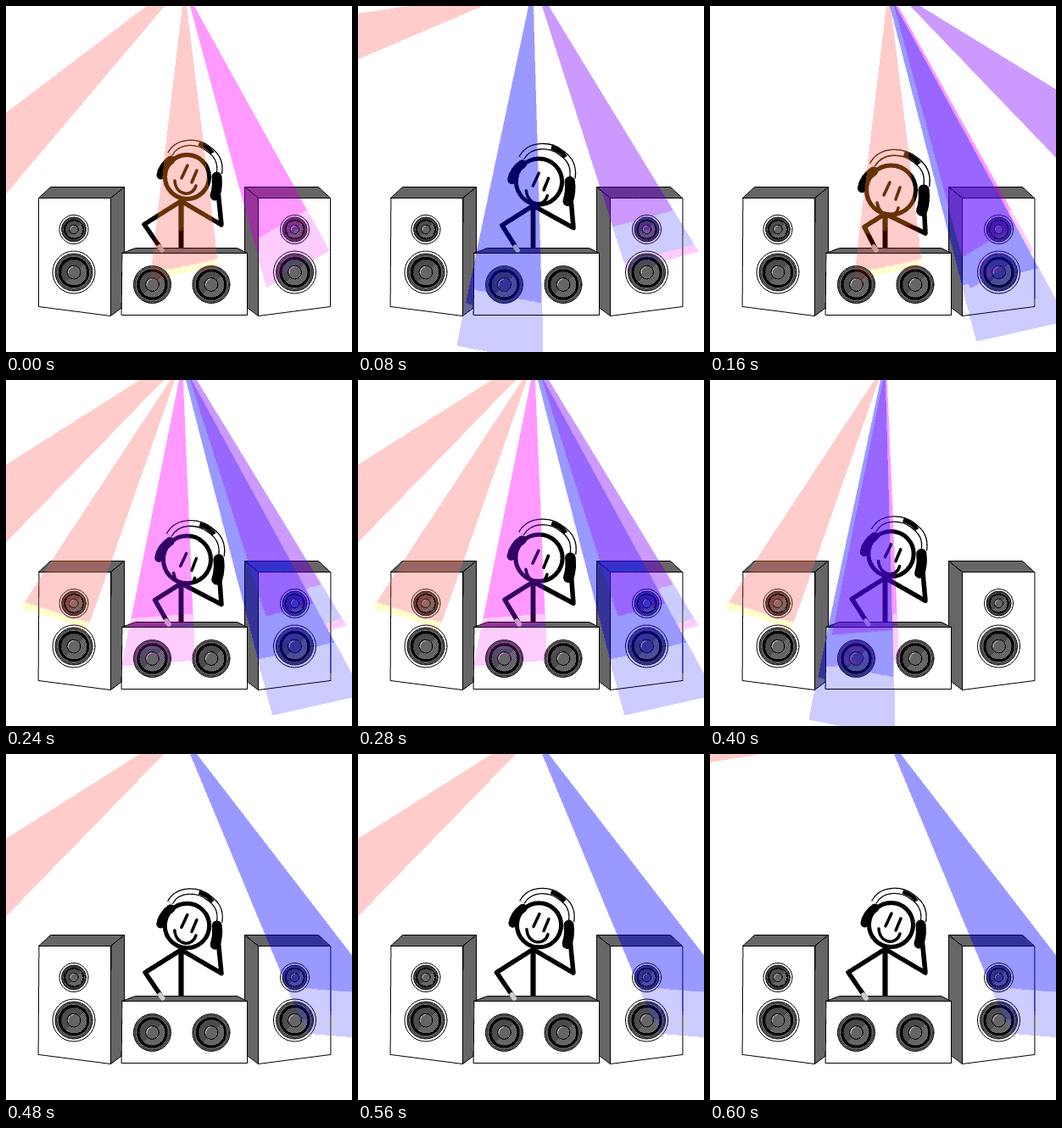
Animation of 408 by 408 pixels, one loop 0.64 s. Source, as an HTML page with a canvas:

```html
<!DOCTYPE html>
<html lang="en">
<head>
<meta charset="utf-8">
<title>Stick figure DJ</title>
<style>
  html, body { margin: 0; width: 100%; height: 100%; overflow: hidden; background: #fff; }
  canvas { display: block; width: 408px; height: 408px; filter: url(#palette); }
  svg { position: absolute; width: 0; height: 0; }
</style>
</head>
<body>
<canvas id="stage" width="408" height="408"></canvas>
<svg aria-hidden="true">
  <!-- rounds every channel to six levels, which bands the fading beams -->
  <filter id="palette" x="0" y="0" width="100%" height="100%" color-interpolation-filters="sRGB">
    <feComponentTransfer>
      <feFuncR type="discrete" tableValues="0 .2 .2 .4 .4 .6 .6 .8 .8 1"/>
      <feFuncG type="discrete" tableValues="0 .2 .2 .4 .4 .6 .6 .8 .8 1"/>
      <feFuncB type="discrete" tableValues="0 .2 .2 .4 .4 .6 .6 .8 .8 1"/>
    </feComponentTransfer>
  </filter>
</svg>
<script>
const ctx = document.getElementById('stage').getContext('2d');
const STEP = 40, STEPS = 16;

const RED = '255,83,40', PINK = '200,0,255', BLUE = '0,0,255', PURPLE = '74,0,255';

// Each lamp: colour, x1 and x2 on the top edge, then the left and right far corners.
const lamps = {
  redFar: [RED, 166, 187, -100, 202, -112, 354],
  redMid: [RED, 158, 186, -95, 160, -112, 307],
  redHigh: [RED, 60, 147, -160, 33, -150, 127],
  redTop: [RED, -60, 60, -200, 0, -180, 40],
  redCenter: [RED, 208, 213, 169, 327, 251, 310],
  redLeft: [RED, 194, 199, 15, 272, 95, 297],
  pinkRight: [PINK, 217, 222, 307, 333, 382, 289],
  pinkCenter: [PINK, 204, 209, 136, 338, 223, 331],
  blueCenter: [BLUE, 201, 207, 116, 401, 219, 421],
  blueRight: [BLUE, 212, 219, 314, 396, 422, 372],
  blueWide: [BLUE, 217, 225, 354, 330, 488, 341],
  purpleRight: [PURPLE, 217, 225, 317, 313, 402, 290],
  purpleFar: [PURPLE, 236, 248, 511, 286, 504, 157]
};

// Light cues: starting step and the lamps that are on.
const cues = [
  [0, 'redFar redCenter pinkRight'],
  [2, 'redHigh blueCenter purpleRight'],
  [4, 'redCenter pinkRight blueRight purpleFar'],
  [6, 'redMid redLeft pinkCenter blueRight purpleRight'],
  [8, 'redLeft pinkCenter blueCenter'],
  [12, 'redMid blueWide'],
  [15, 'redTop blueWide']
].map(([step, names]) => [step, names.split(' ')]);

// How far the figure is ducked, as step and amount.
const duck = [[0, 0], [2, .36], [4, 1], [6, .66], [8, .4], [12, .06], [15, 0]];

function duckAt(step) {
  const i = duck.findIndex(k => k[0] >= step);
  if (i < 1) return duck[0][1];
  const [a, b] = [duck[i - 1], duck[i]];
  return a[1] + (b[1] - a[1]) * (step - a[0]) / (b[0] - a[0]);
}

function path(pts, close) {
  ctx.beginPath();
  for (let i = 0; i < pts.length; i += 2) ctx.lineTo(pts[i], pts[i + 1]);
  if (close) ctx.closePath();
}

// A beam keeps its strength, then fades towards its far edge.
function beam(rgb, x1, x2, lx, ly, rx, ry) {
  const len = Math.hypot(rx - lx, ry - ly);
  const nx = (ly - ry) / len, ny = (rx - lx) / len;
  const top = (x1 + x2) / 2;
  const reach = (lx - top) * nx + ly * ny;
  const fade = ctx.createLinearGradient(top, 0, top + nx * reach, ny * reach);
  fade.addColorStop(.79, `rgba(${rgb},.35)`);
  fade.addColorStop(1, `rgba(${rgb},.105)`);
  path([x1, 0, x2, 0, rx, ry, lx, ly], true);
  ctx.fillStyle = fade;
  ctx.fill();
}

function face(fill, ...pts) {
  path(pts, true);
  ctx.fillStyle = fill;
  ctx.fill();
  ctx.strokeStyle = '#000';
  ctx.lineWidth = 1;
  ctx.stroke();
}

function line(width, ...pts) {
  path(pts);
  ctx.lineWidth = width;
  ctx.stroke();
}

function disc(x, y, r, fill, stroke, width = 1) {
  ctx.beginPath();
  ctx.arc(x, y, r, 0, 7);
  if (fill) { ctx.fillStyle = fill; ctx.fill(); }
  if (stroke) { ctx.strokeStyle = stroke; ctx.lineWidth = width; ctx.stroke(); }
}

function cone(x, y, r) {
  disc(x, y, r, '#666', '#000');
  disc(x, y, r * .92, null, '#333');
  disc(x, y, r * .76, '#333', '#000', r * .14);
  const n = Math.floor(r * .7);
  for (let v = -n; v <= n; v++) {
    for (let u = -n; u <= n; u++) {
      if (u * u + v * v > n * n || (u + v) & 1) continue;
      ctx.fillStyle = u + v > 0 ? '#999' : '#666';
      ctx.fillRect(Math.floor(x) + u, Math.floor(y) + v, 1, 1);
    }
  }
  disc(x, y, r * .36, '#666', '#000');
  ctx.beginPath();
  ctx.arc(x, y, r * .3, 3, 4.6);
  ctx.strokeStyle = '#ccc';
  ctx.stroke();
}

function tower() {
  face('#666', 38, 226, 52, 213, 139, 213, 123, 226);
  face('#666', 123, 226, 139, 213, 139, 353, 123, 365);
  face('#fff', 38, 226, 123, 226, 123, 365, 38, 354);
}

function speakers() {
  ctx.save();
  ctx.translate(.5, .5);
  tower();
  ctx.translate(420, 0);
  ctx.scale(-1, 1);
  tower();
  ctx.restore();
  for (const x of [80, 340.5]) {
    disc(x, 263.5, 17, '#fff', '#000');
    cone(x, 263.5, 14.5);
    disc(x, 314, 25, '#fff', '#000');
    cone(x, 314, 22);
  }
}

function booth() {
  ctx.save();
  ctx.translate(.5, .5);
  face('#666', 136, 291, 152, 285, 272, 285, 284, 291);
  face('#fff', 136, 291, 284, 291, 284, 364, 136, 364);
  ctx.restore();
  cone(172.5, 328.5, 22);
  cone(242, 328.5, 22);
}

function curve(width, color, d) {
  ctx.strokeStyle = color;
  ctx.lineWidth = width;
  ctx.stroke(new Path2D(d));
}

// Drawn around the middle of the head.
function headphones() {
  const band = 'M-20 -27C-10 -45 14 -42 25 -33C35 -26 40 -18 38 -4';
  ctx.lineCap = 'butt';
  curve(7.5, '#000', band);
  curve(5, '#fff', band);
  curve(5, '#000', 'M14 -39C20 -37 26 -34 30 -28');
  ctx.lineCap = 'round';
  curve(10, '#000', 'M-19 -20C-25 -16 -30 -9 -31 -2');
  curve(12, '#000', 'M35 0C36 8 35 16 33 22');
}

function figure(p) {
  const x = 213.5, y = 201.5 + 15.5 * p, r = 26 + 3 * p, neck = 230 + 15 * p;
  ctx.strokeStyle = '#000';
  ctx.lineCap = ctx.lineJoin = 'round';
  line(6, 206.5, neck, 206.5, 285);
  line(5.5, 206.5, neck, 163 + 19 * p, 257.5 + 3 * p, 184 + 12 * p, 288);
  line(5.5, 206.5, neck, 254, 258 + 10 * p, 249 + 3 * p, 208 + 22 * p);
  disc(x, y, r, '#fff', '#000', 5);

  // the face slides down the head as it nods
  const nod = Math.min(1, 1.25 * p), dy = 20 * nod, m = 206 + 26 * nod;
  ctx.save();
  disc(x, y, r);
  ctx.clip();
  line(3.5, 214 - 2 * p, 188 + dy, 207 - 2 * p, 203 + dy);
  line(3.5, 225 - p, 194 + dy, 219, 208 + dy);
  curve(3.5, '#000', `M${199 - 2 * p} ${m}C200 ${m + 18} 220 ${m + 20} ${224 - 2 * p} ${m + 6}`);
  ctx.restore();

  ctx.save();
  ctx.translate(x, y);
  ctx.scale(1 + .1 * p, 1 + .1 * p);
  headphones();
  ctx.restore();
}

function draw(step) {
  const p = duckAt(step);
  ctx.fillStyle = '#fff';
  ctx.fillRect(0, 0, 408, 408);
  speakers();
  figure(p);
  booth();
  // the resting hand lies over the edge of the booth
  line(5.5, 181 + 12 * p, 284, 184 + 12 * p, 288);

  const on = cues.filter(c => c[0] <= step).pop()[1];
  for (const name of on) beam(...lamps[name]);
}

let shown = -1;
const start = performance.now();
function tick() {
  const step = Math.floor((performance.now() - start) / STEP) % STEPS;
  if (step !== shown) draw(shown = step);
  requestAnimationFrame(tick);
}
tick();
</script>
</body>
</html>
```
